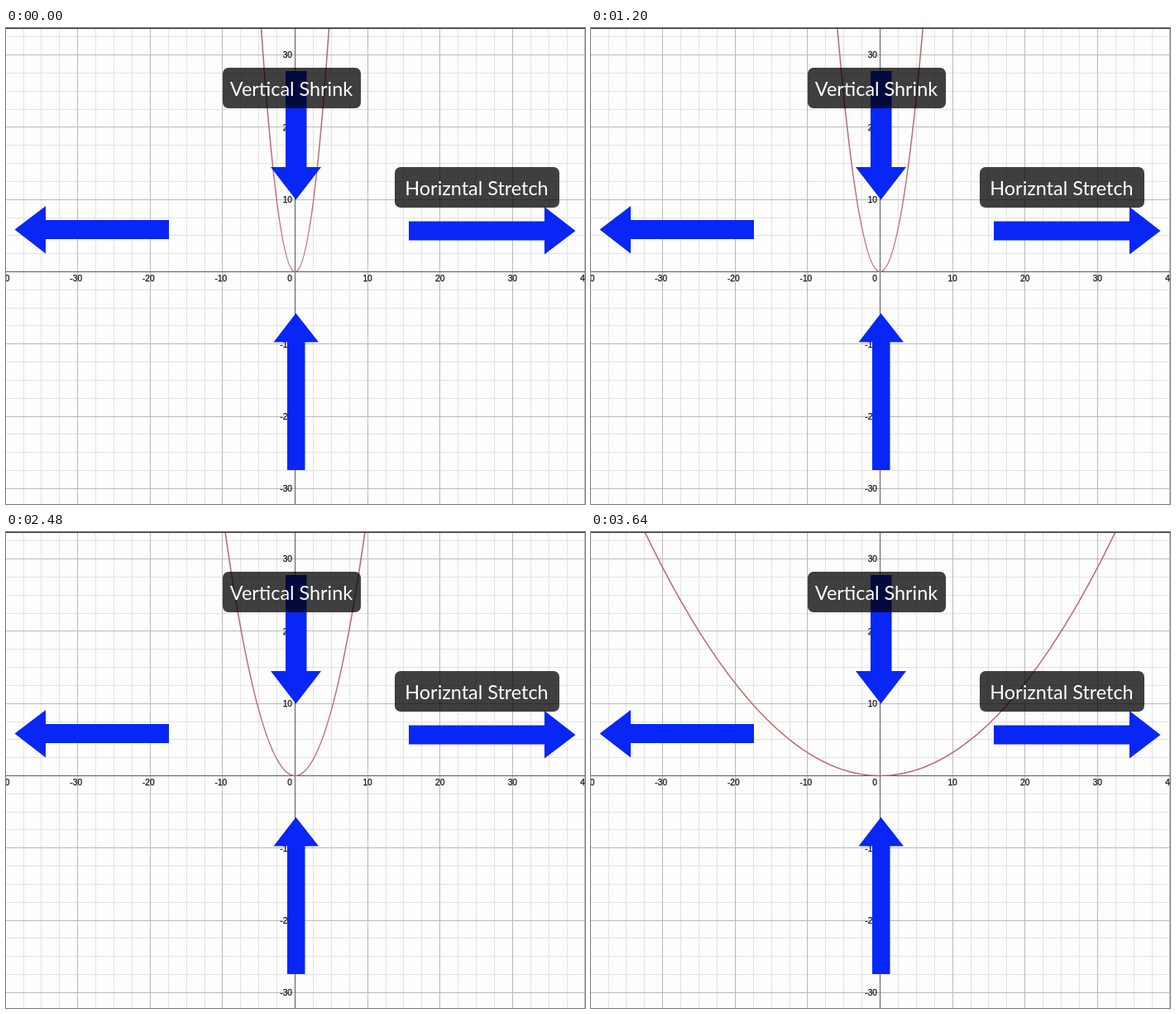
Write an HTML page that moves like this. It is 700 by 575 pixels and loops after 3.68 s.

```html
<!DOCTYPE html>
<html lang="en">
<head>
<meta charset="utf-8">
<title>Parabola stretch</title>
<style>
  html, body { margin: 0; width: 100%; height: 100%; overflow: hidden; background: #fdfdfd; }
  svg { display: block; width: 700px; height: 575px; }
  .minor { stroke: #e2e2e2; }
  .major { stroke: #b9b9b9; }
  .axis { stroke: #5a5a5a; }
  .ticks { font: 10.2px "Liberation Sans", Arial, sans-serif; fill: #111; stroke: #111; stroke-width: .25; }
  .arrows { fill: #0826f5; }
  .tag rect { fill: #000; fill-opacity: .75; }
  .tag text { font: 23.4px Lato, sans-serif; fill: #fff; text-anchor: middle; }
  #curve { fill: none; stroke: #b9666a; stroke-width: 1.5; }
</style>
</head>
<body>
<svg viewBox="0 0 700 575">
  <rect width="700" height="575" fill="#fdfdfd"/>
  <g id="grid"></g>
  <g id="ticks" class="ticks"></g>
  <path id="curve"/>
  <path d="M0 .5H700" stroke="#222"/>
  <g class="arrows">
    <path d="M10.5 243.5L48 215V232H197V255H48V272.500Z"/>
    <path d="M688.5 245L651 216V233.500H487V256.500H651V273.500Z"/>
    <path d="M350.500 207.500L320 168H338V52H363.500V168H381Z"/>
    <path d="M350.500 344.500L323.500 379.500H340V534H361.500V379.500H378Z"/>
  </g>
  <g class="tag">
    <rect x="262" y="48" width="167" height="49" rx="7"/>
    <text x="345" y="82">Vertical Shrink</text>
    <rect x="470" y="168" width="199" height="49" rx="7"/>
    <text x="569" y="202">Horizntal Stretch</text>
  </g>
</svg>
<script>
const X0 = 349.5, Y0 = 294.5, UX = 87.6, UY = 87.3, MINOR = 4;
const LOOP = 3680, STEP = 40;
const $ = id => document.getElementById(id);

function add(parent, tag, attrs, text) {
  const el = document.createElementNS("http://www.w3.org/2000/svg", tag);
  for (const k in attrs) el.setAttribute(k, attrs[k]);
  if (text !== undefined) el.textContent = text;
  parent.append(el);
}

const snap = v => Math.round(v - .5) + .5;

function gridLines(cls, test) {
  let d = "";
  for (let i = -4 * MINOR; i <= 4 * MINOR; i++) {
    if (!test(i)) continue;
    d += `M${snap(X0 + i * UX / MINOR)} 0V575M0 ${snap(Y0 + i * UY / MINOR)}H700`;
  }
  add($("grid"), "path", { d, class: cls });
}
gridLines("minor", i => i % MINOR);
gridLines("major", i => i && i % MINOR === 0);
gridLines("axis", i => i === 0);

for (let n = -4; n <= 4; n++) {
  const x = n ? X0 + n * UX - (n < 0 ? 2 : 0) : 343;
  add($("ticks"), "text", { x, y: 305.5, "text-anchor": "middle" }, n * 10);
  if (n && Math.abs(n) < 4)
    add($("ticks"), "text", { x: 346, y: Y0 - n * UY + 3.7, "text-anchor": "end" }, n * 10);
}

// [time, half width of the curve at the top edge]
const keys = [[0, 41], [180, 41], [600, 44.5], [1120, 50.5], [1200, 51.7], [1640, 59.2],
  [1720, 61], [2240, 73.5], [2480, 84.5], [2800, 98], [2920, 121.5], [3360, 164],
  [3600, 284.5], [LOOP, 284.5]];

// The coefficient, proportional to 1 / width², moves linearly between keys.
function widthAt(t) {
  const i = keys.findIndex(k => k[0] > t);
  const [t0, w0] = keys[i - 1], [t1, w1] = keys[i];
  const a0 = w0 ** -2, a1 = w1 ** -2;
  return (a0 + (a1 - a0) * (t - t0) / (t1 - t0)) ** -.5;
}

function draw(now) {
  const t = Math.floor(now % LOOP / STEP) * STEP;
  const w = widthAt(t);
  $("curve").setAttribute("d", `M${X0 - w} 0Q${X0} ${2 * Y0} ${X0 + w} 0`);
}

let start;
function tick(now) {
  start ??= now;
  draw(now - start);
  requestAnimationFrame(tick);
}
draw(0);
requestAnimationFrame(tick);
</script>
</body>
</html>
```
